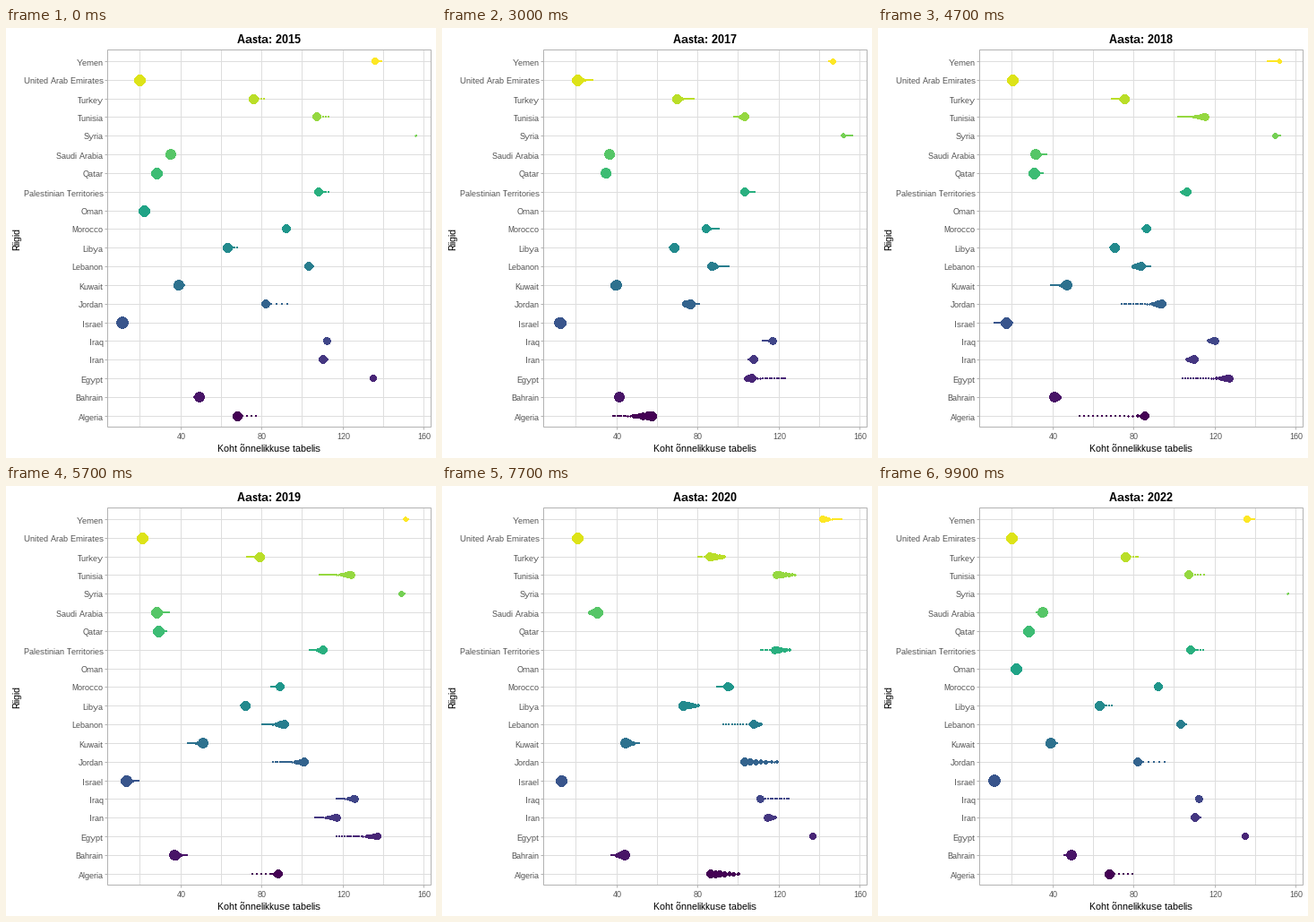
These frames come from a looping animation (480x480 px, 10000 ms). A matplotlib script:

```python
from functools import lru_cache

import numpy as np
import matplotlib.pyplot as plt
from matplotlib.animation import FuncAnimation
from matplotlib.collections import PolyCollection

plt.rcParams.update({
    "font.family": ["Liberation Sans", "DejaVu Sans"],
    "text.hinting": "native",       # whole-pixel glyph shapes and advances
    "text.hinting_factor": 1,
})

SIZE, DPI = 480, 96
PT = 72 / DPI                     # points per pixel
FRAMES, WAKE = 100, 20
LEFT, RIGHT, TOP, BOTTOM = 113, 474, 24, 445
NA = np.nan

# Rank per year, 2015 to 2020
RANKS = {
    "Yemen": (136, 147, 146, 152, 151, 146),
    "United Arab Emirates": (20, 28, 21, 20, 21, 21),
    "Turkey": (76, 78, 69, 74, 79, 93),
    "Tunisia": (107, 98, 102, 111, 124, 128),
    "Syria": (156, 156, 152, 150, 149, NA),
    "Saudi Arabia": (35, 34, 37, 33, 28, 27),
    "Qatar": (28, 36, 35, 32, 29, NA),
    "Palestinian Territories": (108, 108, 103, 104, 110, 125),
    "Oman": (22, NA, NA, NA, NA, NA),
    "Morocco": (92, 90, 84, 85, 89, 97),
    "Libya": (63, 67, 68, 70, 72, 80),
    "Lebanon": (103, 93, 88, 80, 91, 111),
    "Kuwait": (39, 41, 39, 45, 51, 48),
    "Jordan": (82, 80, 74, 90, 101, 119),
    "Israel": (11, 11, 11, 19, 13, 14),
    "Iraq": (112, 112, 117, 117, 126, 110),
    "Iran": (110, 105, 108, 106, 117, 118),
    "Egypt": (135, 120, 104, 122, 137, 138),
    "Bahrain": (49, 42, 41, 43, 37, 40),
    "Algeria": (68, 38, 53, 84, 88, 100),
}
KEYS = np.round(np.arange(8) * (FRAMES - 1) / 7).astype(int)

# Happiness score as a function of rank; it sets the dot size
SCORE_RANK = (11, 20, 28, 39, 49, 68, 82, 92, 108, 135, 147, 152, 156)
SCORE = (7.278, 6.9, 6.6, 6.29, 5.96, 5.6, 5.2, 5.02, 4.72, 4.19, 3.65, 3.4, 3.006)


def x_px(rank):
    return 113.2 + (rank - 3.75) * 2.2625


def tween(keys):
    """Linear motion between key states; rows without a successor vanish."""
    out = []
    for f in range(FRAMES):
        k = np.searchsorted(KEYS, f, side="right") - 1
        if f == KEYS[k]:
            out.append(keys[k])
        else:
            p = (f - KEYS[k]) / (KEYS[k + 1] - KEYS[k])
            out.append(keys[k] + (keys[k + 1] - keys[k]) * p)
    return np.array(out)


@lru_cache(maxsize=None)
def disc(d):
    """Stepped outline of a disc d pixels wide, from its top left corner."""
    rows = np.arange(d)
    odd = d % 2 / 2
    half = np.sqrt((d / 2 - .1) ** 2 - (rows + .5 - d / 2) ** 2)
    half = np.repeat(np.floor(half + .5 - odd) + odd, 2)
    y = np.c_[rows, rows + 1].ravel()
    return np.r_[np.c_[d / 2 + half, y], np.c_[d / 2 - half, y][::-1]]


ranks = np.array(list(RANKS.values())).T
score = np.interp(ranks, SCORE_RANK, SCORE)
score[1:] = np.maximum(score[1:], 3.07)
sizes = 1 + 5 * np.sqrt((score - SCORE[-1]) / (SCORE[0] - SCORE[-1]))
# The last two years hold the opening state again
xs = tween(x_px(np.vstack([ranks, ranks[:1], ranks[:1]])))
sizes = tween(np.vstack([sizes, sizes[:1], sizes[:1]]))
rows = np.floor(37.33 + 20.84 * np.arange(len(RANKS)))
colors = plt.cm.viridis(np.linspace(1, 0, len(RANKS)))

fig = plt.figure(figsize=(SIZE / DPI, SIZE / DPI), dpi=DPI, facecolor="white")
ax = fig.add_axes([0, 0, 1, 1])
ax.set(xlim=(0, SIZE), ylim=(SIZE, 0))
ax.axis("off")


def line(x0, y0, x1, y1, color, z):
    ax.plot([x0 + .5, x1 + .5], [y0 + .5, y1 + .5], color=color, lw=PT,
            solid_capstyle="butt", snap=False, zorder=z)


def label(x, y, text, px, color="black", **kw):
    return ax.text(x, y, text, fontsize=px * PT, color=color,
                   va="baseline", **kw)


GRID, EDGE, TICK = "#dedede", "#b3b3b3", "#4d4d4d"
for y, name in zip(rows, RANKS):
    line(LEFT, y, RIGHT, y, GRID, 1)
    line(LEFT - 3, y, LEFT, y, EDGE, 4)
    label(108.5, y + 4.5, name, 9, TICK, ha="right")
for v in range(20, 161, 20):
    x = np.floor(x_px(v))
    line(x, TOP, x, BOTTOM, GRID, 1)
    if v % 40 == 0:
        line(x, BOTTOM, x, BOTTOM + 3, EDGE, 4)
        label(x + .5, 459, str(v), 9, TICK, ha="center")
ax.add_patch(plt.Rectangle((LEFT + .5, TOP + .5), RIGHT - LEFT, BOTTOM - TOP,
                           fill=False, ec=EDGE, lw=PT, snap=False, zorder=4))
label(293.5, 473, "Koht õnnelikkuse tabelis", 11, ha="center")
label(15, 235.5, "Riigid", 11, ha="center", rotation=90,
      rotation_mode="anchor")
title = label(293, 17, "", 13, ha="center", weight="bold")
dots = ax.add_collection(PolyCollection([], linewidths=0, zorder=3),
                         autolim=False)


def draw(f):
    ages = np.arange(WAKE)[::-1]
    past = (f - ages) % FRAMES
    size = sizes[past] * ((1 - ages / WAKE) ** 3)[:, None]
    x = xs[past]
    seen = ~np.isnan(x)
    y = np.broadcast_to(rows, x.shape)[seen]
    # Whole-pixel diameters and positions
    d = np.maximum(.75 * (size[seen] * 2.845 + .945) + .5, 2).astype(int)
    left = np.floor(x[seen] - d / 2 + .5)
    top = y - d // 2
    dots.set_verts([disc(int(n)) + (a, b) for n, a, b in zip(d, left, top)])
    dots.set_facecolors(np.broadcast_to(colors, x.shape + (4,))[seen])
    title.set_text(f"Aasta: {2015 + round(f * 7 / (FRAMES - 1))}")
    return dots, title


anim = FuncAnimation(fig, draw, frames=FRAMES, interval=100, repeat=True,
                     repeat_delay=0, blit=False)
plt.show()
```
